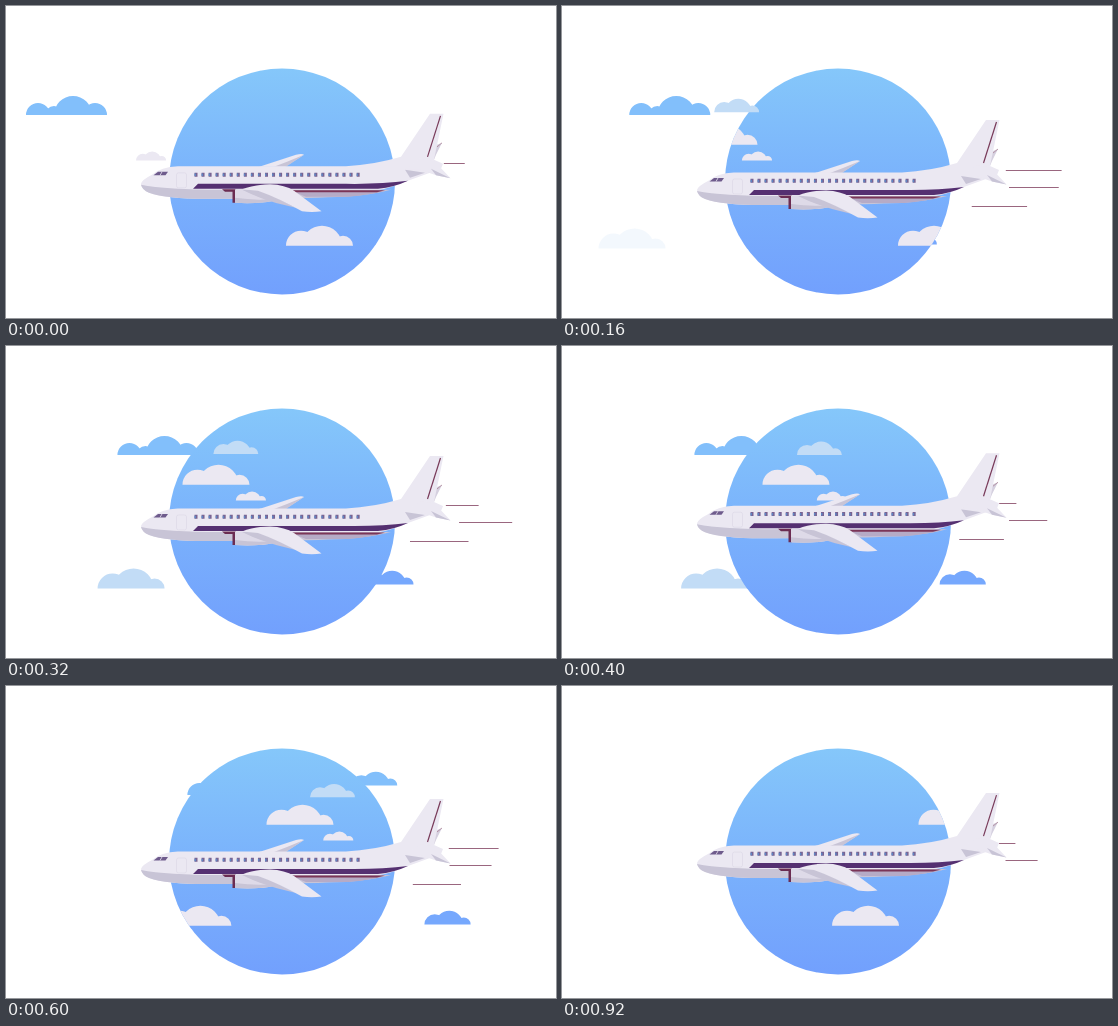
Recreate the animation shown at these times as an HTML page. Size 550 px wide and 312 px high, loop 0.96 s.

```html
<!DOCTYPE html>
<html lang="en">
<head>
<meta charset="utf-8">
<title>Plane</title>
<style>
  html, body { margin: 0; width: 100%; height: 100%; overflow: hidden; background: #fff; }
  svg { display: block; width: 100%; height: 100%; }
  .light { fill: #ebe8f2; }
  .shade { fill: #c8c4d6; }
  .line { fill: none; }
</style>
</head>
<body>
<svg viewBox="0 0 550 312">
  <defs>
    <linearGradient id="sky" x2="0" y2="1">
      <stop offset="0" stop-color="#85c7fa"/>
      <stop offset=".5" stop-color="#7ab2fc"/>
      <stop offset="1" stop-color="#72a0fd"/>
    </linearGradient>
    <clipPath id="disc"><circle cx="276" cy="175.5" r="113"/></clipPath>
  </defs>
  <g id="back"></g>
  <circle cx="276" cy="175.5" r="113" fill="url(#sky)"/>
  <g id="inside" clip-path="url(#disc)"></g>
  <g id="front"></g>

  <g id="plane">
    <!-- far wing and far stabiliser -->
    <path class="light" d="M253 160L290 148Q296 146.500 298 148L279 160Z"/>
    <path class="shade" d="M268 160L281 155L298 148L280 160Z"/>
    <path fill="#d5d0df" d="M424 152L431 138L436 136L430 148L428 153Z"/>
    <path class="line" stroke="#a5778c" stroke-width=".7" d="M431 140L436 136"/>
    <!-- fuselage and fin -->
    <path class="light" d="M135 177Q136 173 146 168Q155 160 172 159.500H340Q368 158 395 150L424 107H437.500L428 153L437 157L435 162L402 174Q380 184 350 187Q300 192 200 192Q160 192 143 186Q135 182 135 177Z"/>
    <path class="shade" d="M135 178Q160 183 216 183H385Q366 188 340 190Q290 192 200 192Q160 192 143 186Q136 183 135 178Z"/>
    <path fill="#b6abc6" d="M285 184H380Q364 188 342 190H300Z"/>
    <path class="line" stroke="#783a59" stroke-width="1.2" d="M434.500 109L421.500 150"/>
    <!-- stripes -->
    <path fill="#553071" d="M187 182L192 177H340Q375 177.500 402 174Q388 180.500 372 182Z"/>
    <path fill="#7b3557" d="M280 183.500H379L371 185.500H285Z"/>
    <path fill="#6b2c52" d="M216 182.500H230V196H226.500V185H219Z"/>
    <!-- near stabiliser -->
    <path class="shade" d="M399 163L419 166L404 171Z"/>
    <path class="light" d="M399 163L414 152L428 154L444.500 171.500L430 168.500L414 163Z"/>
    <path class="shade" d="M425 162L444.500 171.500L430 168.500Z"/>
    <!-- cockpit, door, windows -->
    <path fill="#6e5b8c" d="M147.500 168.500L152 165H162L159.500 168.500Z"/>
    <path class="line" stroke="#ebe8f2" stroke-width=".8" d="M154 168.500L156 165"/>
    <rect class="line" x="170.500" y="166" width="10" height="15" rx="2" stroke="#ddd9e7" stroke-width=".7"/>
    <path class="line" stroke="#7a6391" stroke-width="4" stroke-dasharray="3 4.050" d="M188.500 167.800H354"/>
    <path class="line" stroke="#5d86c4" stroke-width="2.5" stroke-dasharray="1.500 5.550" d="M188.500 168H354"/>
    <!-- engine and near wing -->
    <path fill="#dedae8" d="M229 182.500H262L268 194Q250 197.500 229 196Z"/>
    <path class="shade" d="M229 191Q250 194 268 192V194Q250 197.500 229 196Z"/>
    <path class="shade" d="M236 183L256 183L290 201Q260 195 236 183Z"/>
    <path class="light" d="M236 182.500Q248 177.500 264 177.500Q279 178 288 184L315.500 204.500Q306 206 296 204.500Q270 190 252 184Z"/>
  </g>
  <g id="trails" stroke="#9a667f"></g>
</svg>
<script>
const LOOP = 960, BEAT = 480, STEP = 40;
const WHITE = '#ebe8f2', BLUE = '#82bffb', DEEP = '#76a8fd', PALE = '#c2dcf6';
const $ = id => document.getElementById(id);

function set(el, attrs) {
  for (const k in attrs) el.setAttribute(k, attrs[k]);
  return el;
}
const add = (parent, tag, attrs) =>
  $(parent).appendChild(set(document.createElementNS('http://www.w3.org/2000/svg', tag), attrs));

// 0 to 1 and back once per beat, highest at the given time
const wave = (t, peak) => (1 + Math.cos((t - peak) / BEAT * 2 * Math.PI)) / 2;
const ramp = (t, from) => Math.max(0, Math.min(1, (t - from) / 100));

// half discs on a flat base: [centre, radius]
const puffs = list => list.map(([c, r]) => `M${c - r} 0a${r} ${r} 0 0 1 ${2 * r} 0z`).join('');
const PUFF = puffs([[15, 15], [36, 20], [57, 10]]);
const LONG = puffs([[12, 12], [28, 9], [47, 19], [69, 12]]);

const clouds = [];
function cloud(layer, fill, { d = PUFF, ...motion }) {
  clouds.push({ size: 1, sink: 0, drag: 0, from: -LOOP, to: LOOP, ...motion,
    el: add(layer, 'path', { d, fill }) });
}
cloud('back', BLUE, { x: 20, y: 109, speed: .305, drag: .00006, d: LONG });
cloud('back', PALE, { x: -18.5, y: 242.5, speed: .344, from: 140 });
cloud('back', BLUE, { x: 234, y: 99.5, speed: .185, size: .69, to: 780 });
cloud('back', DEEP, { x: 296, y: 238.5, speed: .204, size: .69, to: 620 });
cloud('inside', WHITE, { x: 80.5, y: 138.7, speed: .3 });
cloud('inside', WHITE, { x: 280, y: 239.7, speed: .35 });
cloud('inside', WHITE, { x: -51, y: 239.7, speed: .349 });
cloud('front', PALE, { x: 97, y: 104.3, speed: .345, sink: .0117, size: .67, from: 60, to: 780 });
cloud('front', WHITE, { x: 130, y: 154.5, speed: .312, size: .45, to: 620 });

// speed lines sway and stretch with the beat; two of them vanish at their lowest
const trails = [
  { row: 0, x: 437, sway: 7, peak: 186, width: 16, grow: 41, widest: 186, rest: 0 },
  { row: 17, x: 440, sway: 14, peak: 280, width: 29, grow: 30, widest: 250, rest: .07 },
  { row: 36, x: 396, sway: 15, peak: 205, width: 36, grow: 28, widest: 250, rest: .07 }
].map(trail => ({ ...trail, el: add('trails', 'line', {}) }));

function draw(t) {
  const bob = 7.24 * wave(t, 186);
  set($('plane'), { transform: `translate(0 ${bob.toFixed(2)})` });

  for (const c of clouds) {
    const x = c.x + c.speed * t - c.drag * t * t, y = c.y + c.sink * t;
    set(c.el, {
      transform: `translate(${x} ${y}) scale(${c.size})`,
      opacity: ramp(t, c.from) * (1 - ramp(t, c.to))
    });
  }

  for (const s of trails) {
    const lift = wave(t, s.peak), y = 157.5 + s.row + Math.floor(bob);
    const x1 = s.x + s.sway * lift, x2 = x1 + s.width + s.grow * wave(t, s.widest);
    set(s.el, { x1, x2, y1: y, y2: y, opacity: +(lift >= s.rest) });
  }
}

let start;
function tick(now) {
  start ??= now;
  draw(Math.floor((now - start) % LOOP / STEP) * STEP);
  requestAnimationFrame(tick);
}
draw(0);
requestAnimationFrame(tick);
</script>
</body>
</html>
```
